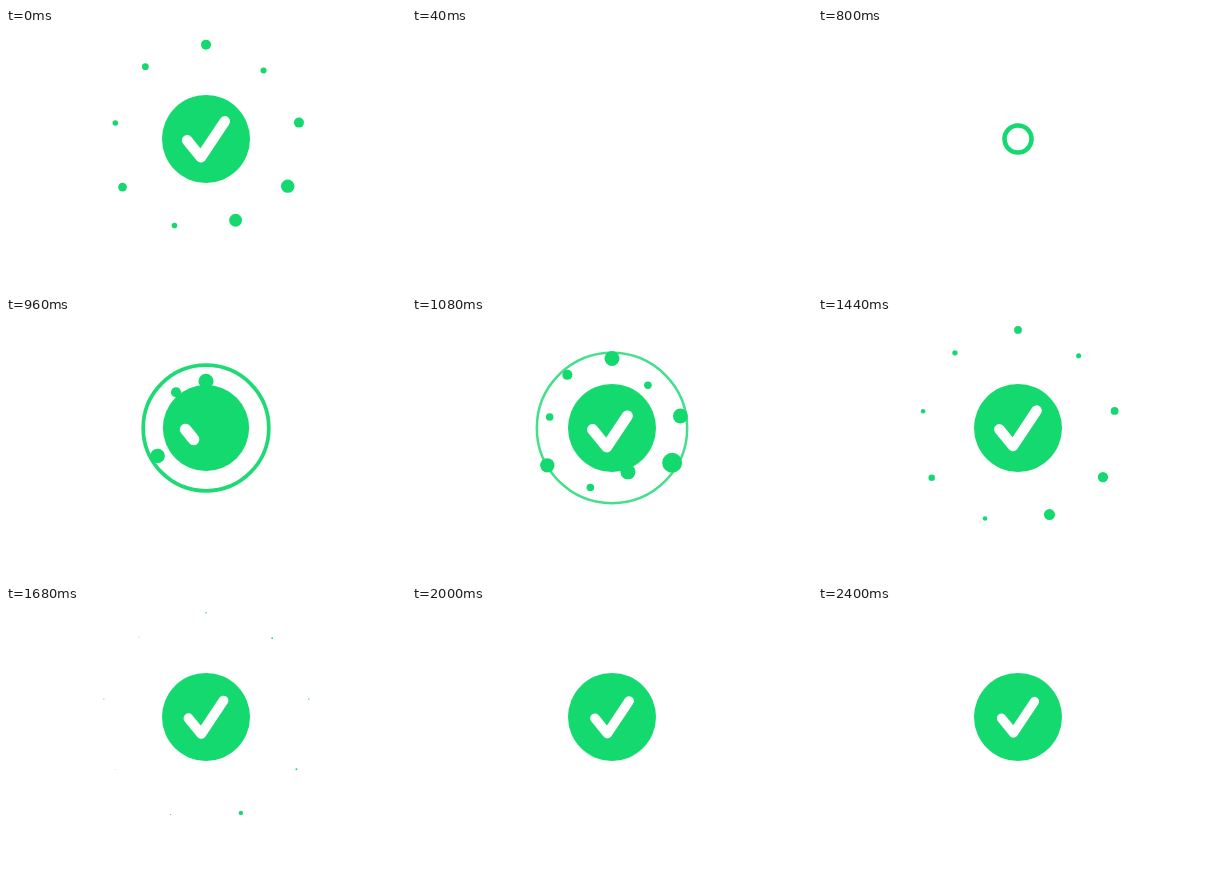
Animation of 400 by 261 pixels, one loop 4 s. Source, as an HTML page with a canvas:

```html
<!DOCTYPE html>
<html lang="en">
<head>
<meta charset="utf-8">
<title>Success check</title>
<style>
  html, body { margin: 0; width: 100%; height: 100%; overflow: hidden; background: #fff; }
  canvas { display: block; width: 100%; height: 100%; }
</style>
</head>
<body>
<canvas id="stage" width="400" height="261"></canvas>
<script>
const ctx = document.getElementById('stage').getContext('2d');
const GREEN = '#14d96f';
const LOOP = 4000, STEP = 40, START = 800, POSTER = 1360;
const DISC = 44, RING = 83, REACH = 105;

const progress = (t, start, duration) => Math.min(1, Math.max(0, (t - start) / duration));
const easeOut = (u, power) => 1 - (1 - u) ** power;
const smooth = u => u * u * (3 - 2 * u);

// CSS-style cubic-bezier timing, solved by bisection.
function bezier(x1, y1, x2, y2) {
  const at = (a, b, s) => 3 * (1 - s) ** 2 * s * a + 3 * (1 - s) * s * s * b + s ** 3;
  return u => {
    let low = 0, high = 1;
    for (let i = 0; i < 24; i++) {
      const mid = (low + high) / 2;
      if (at(x1, x2, mid) < u) low = mid; else high = mid;
    }
    return at(y1, y2, high);
  };
}
const burst = bezier(0.05, 0.5, 0.3, 0.95);
const shrink = bezier(0.35, 0, 0.65, 0.75);

// Nine dots, 40 degrees apart, clockwise from the top
const dots = [
  { r: 7.5 },
  { r: 3.8, delay: 80 },
  { r: 7.5, from: 1000 },
  { r: 10, from: 1000 },
  { r: 7.5, delay: 120 },
  { r: 3.8, delay: 40 },
  { r: 7.3, delay: -40 },
  { r: 3.8, delay: 40 },
  { r: 5.1 }
];

const CHECK = [[-16.5, 1.2], [-4.5, 16], [16.5, -15.5]];
const CHECK_LENGTH = Math.hypot(12, 14.8) + Math.hypot(21, 31.5);
const BOUNCE = [[960, 1.24], [1240, 1.09], [1360, 1.14], [1680, 1.06], [2400, 1]];

function checkScale(t) {
  let scale = BOUNCE[0][1];
  for (let i = 1; i < BOUNCE.length; i++) {
    const [start, a] = BOUNCE[i - 1], [end, b] = BOUNCE[i];
    scale += (b - a) * smooth(progress(t, start, end - start));
  }
  return scale;
}

function circle(x, y, r) {
  ctx.beginPath();
  ctx.arc(x, y, r, 0, 2 * Math.PI);
}

function drawRing(t) {
  const p = progress(t, 788, 500);
  if (p === 1) return;
  ctx.globalAlpha = 1 - p ** 3;
  ctx.lineWidth = 4.6 * (1 - p ** 1.5);
  circle(0, 0, RING * burst(p));
  ctx.stroke();
  ctx.globalAlpha = 1;
}

function drawDots(t) {
  dots.forEach(({ r, delay = 0, from = START }, i) => {
    if (t < from) return;
    const angle = (i * 40 - 90) * Math.PI / 180;
    const distance = REACH * burst(progress(t - delay, 860, 880));
    const size = r * (1 - shrink(progress(t - delay, 1040, 720)));
    if (distance < 1) return;
    circle(distance * Math.cos(angle), distance * Math.sin(angle), size);
    ctx.fill();
  });
}

function drawCheck(t) {
  const drawn = easeOut(progress(t, 940, 210), 2);
  if (drawn === 0) return;
  const scale = checkScale(t);
  ctx.scale(scale, scale);
  ctx.strokeStyle = '#fff';
  ctx.lineWidth = 9.3;
  ctx.lineCap = ctx.lineJoin = 'round';
  ctx.setLineDash(drawn < 1 ? [drawn * CHECK_LENGTH, 2 * CHECK_LENGTH] : []);
  ctx.beginPath();
  CHECK.forEach(([x, y]) => ctx.lineTo(x, y));
  ctx.stroke();
}

function draw(t) {
  ctx.clearRect(0, 0, 400, 261);
  if (t < START) return;
  ctx.save();
  ctx.translate(200, 111);
  ctx.fillStyle = ctx.strokeStyle = GREEN;
  drawRing(t);
  drawDots(t);
  circle(0, 0, DISC * easeOut(progress(t, START, 220), 3));
  ctx.fill();
  drawCheck(t);
  ctx.restore();
}

const origin = performance.now();
function tick() {
  const elapsed = (performance.now() - origin) % LOOP;
  const t = Math.floor(elapsed / STEP) * STEP;
  draw(t < STEP ? POSTER : t); // the loop opens on a brief still
  requestAnimationFrame(tick);
}
tick();
</script>
</body>
</html>
```
